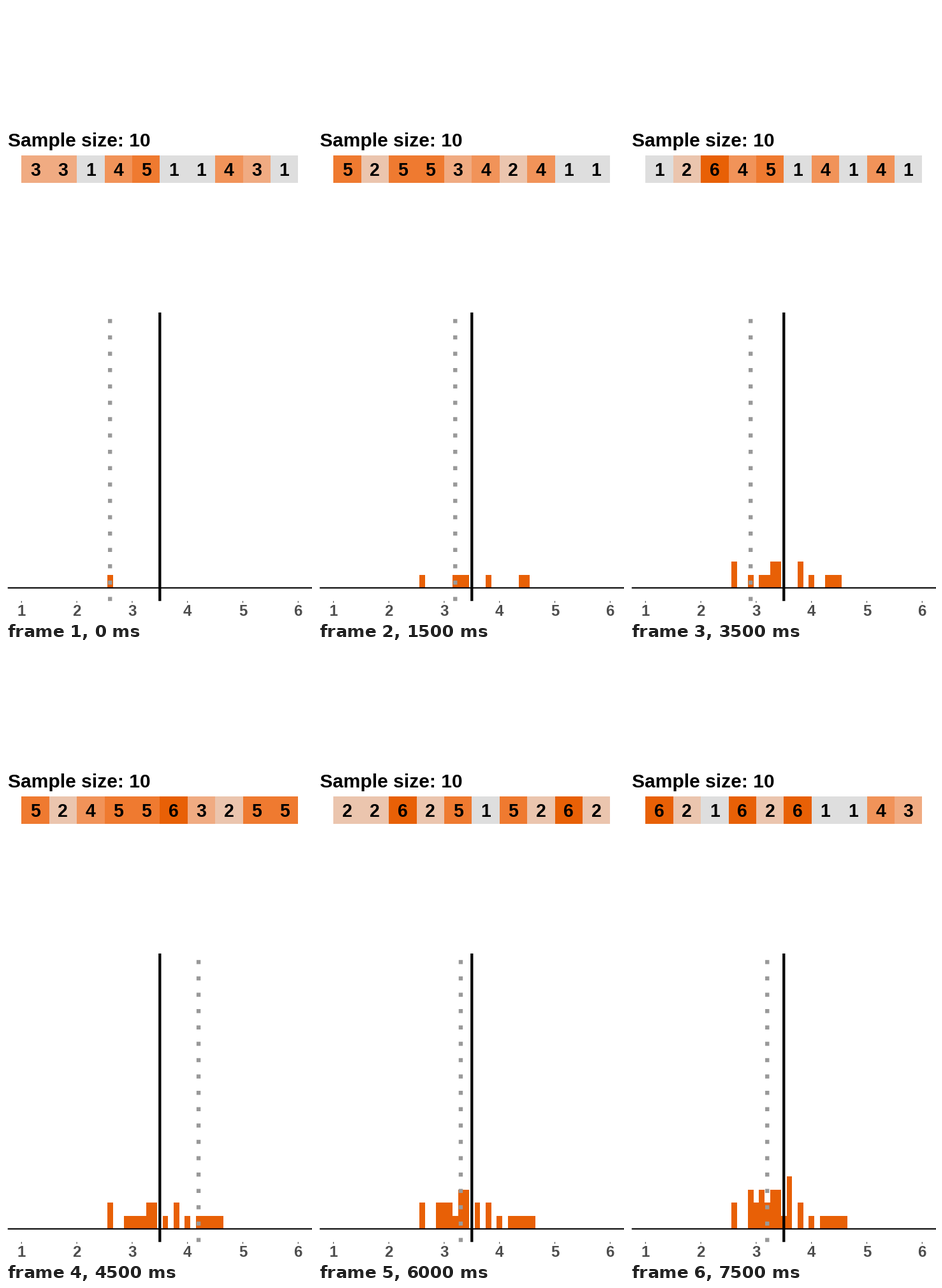
Animation of 480x960 px, one loop 8000 ms. Source, as a matplotlib script:

```python
import matplotlib.pyplot as plt
from matplotlib.animation import FuncAnimation
from matplotlib.patches import Rectangle

W, H, DPI = 480, 960, 96
PT = 72 / DPI                      # points per pixel
LEFT, UNIT = 24.3, 86.8            # x of value 1, pixels per value
TOP, BOTTOM, BASE, STEP = 480, 931.8, 911.3, 20.54
TILE_TOP, TILE_BOTTOM = 234, 277
ORANGE = "#E86006"
SHADES = ["#DEDEDE", "#EBC5AE", "#F0AB82", "#F19359", "#EF7A30", ORANGE]

# Dice rolls on display, one row of ten per frame
ROLLS = [
    "3314511431", "4263154252", "2536436432", "5255342411",
    "3546245353", "6324651425", "1432632514", "1264514141",
    "3624354243", "5245563255", "4135243513", "3421436124",
    "2262515262", "4315243414", "3542435243", "6216261143",
]
# Totals of the samples drawn between two displayed rows
BETWEEN = [44, 45, 33, 33, 43, 34, 26, 46, 30, 29, 36, 34, 36, 29, 36]

SUMS = [sum(map(int, row)) for row in ROLLS]

plt.rcParams["font.family"] = "Liberation Sans"
plt.rcParams["font.weight"] = "bold"

fig = plt.figure(figsize=(W / DPI, H / DPI), dpi=DPI, facecolor="white")
ax = fig.add_axes([0, 0, 1, 1])
ax.set_xlim(0, W)
ax.set_ylim(H, 0)
ax.axis("off")


def x_of(value):
    return LEFT + (value - 1) * UNIT


def box(x0, x1, y0, y1, color, z):
    x0, x1, y0, y1 = (int(v + 0.5) for v in (x0, x1, y0, y1))
    patch = Rectangle((x0, y0), x1 - x0, y1 - y0, fc=color, lw=0, zorder=z)
    return ax.add_patch(patch)


def line(xs, ys, width, color, z, **kw):
    return ax.plot(xs, ys, color=color, lw=width * PT, zorder=z, snap=False,
                   solid_capstyle="butt", dash_capstyle="butt", **kw)[0]


def label(x, y, text, size, color="black", ha="center"):
    return ax.text(x, y, text, size=size * PT, color=color, ha=ha,
                   va="baseline", zorder=6)


label(2.8, 220.5, "Sample size: 10", 30, ha="left")

tiles, digits = [], []
for k in range(10):
    x = LEFT + k * UNIT / 2
    tiles.append(box(x, x + UNIT / 2, TILE_TOP, TILE_BOTTOM, SHADES[0], 1))
    digits.append(label(x + UNIT / 4, 266, "", 28.5))

bars = {}
for total in sorted(set(SUMS + BETWEEN)):
    x = x_of(total / 10)
    bars[total] = box(x - UNIT / 20, x + UNIT / 20, BASE, BASE, ORANGE, 1)

mean_line = line([0, 0], [BOTTOM, TOP], 6.4, "#999999", 3, linestyle=(0, (1, 3)))
line([x_of(3.5)] * 2, [BOTTOM, TOP], 4.3, "black", 4)
line([2.7, W], [BASE, BASE], 2.1, "black", 2)

for value in range(1, 7):
    x = x_of(value)
    line([x, x], [BOTTOM, BOTTOM + 2.75], 1.1, "#333333", 2)
    label(x, 955, str(value), 24, "#4D4D4D")


def update(i):
    for roll, tile, digit in zip(ROLLS[i], tiles, digits):
        tile.set_facecolor(SHADES[int(roll) - 1])
        digit.set_text(roll)
    drawn = SUMS[:i + 1] + BETWEEN[:i]
    base = int(BASE + 0.5)
    for total, bar in bars.items():
        top = int(BASE - STEP * drawn.count(total) + 0.5)
        bar.set_y(top)
        bar.set_height(base - top)
    mean_line.set_xdata([x_of(SUMS[i] / 10)] * 2)
    return [*tiles, *digits, *bars.values(), mean_line]


anim = FuncAnimation(fig, update, frames=len(ROLLS), interval=500,
                     repeat=True, repeat_delay=0, blit=False)
plt.show()
```
